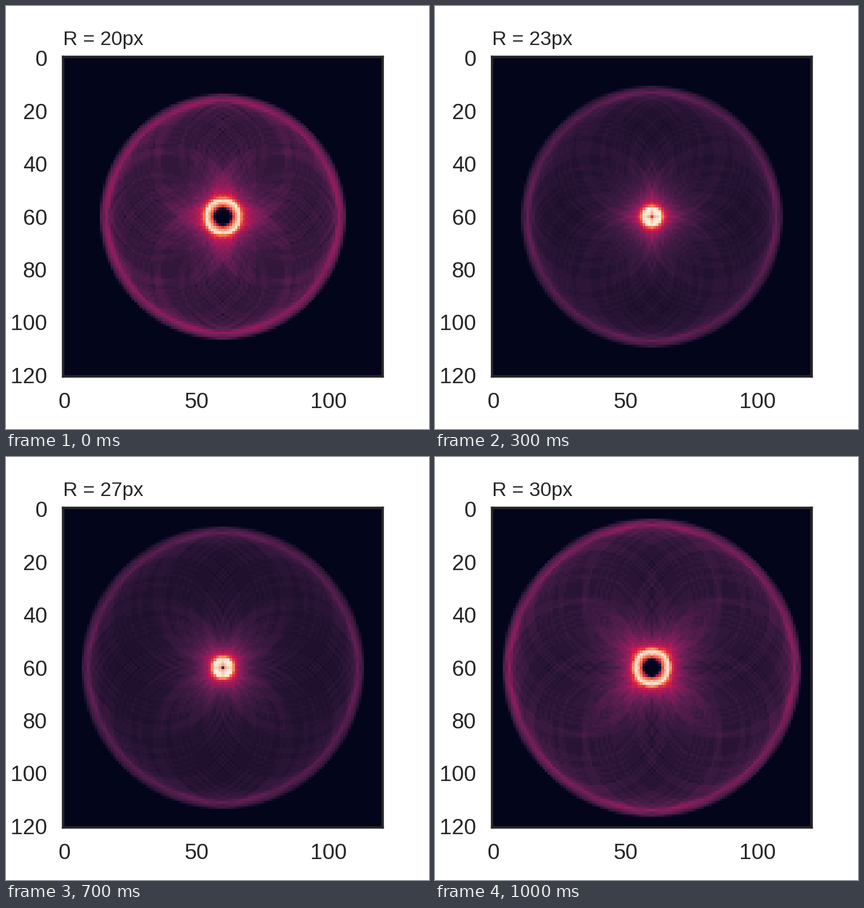
Recreate the animation shown at these times as a matplotlib script. Size 748 px wide and 748 px high, loop 1.1 s.

```python
import numpy as np
import matplotlib.pyplot as plt
from matplotlib.animation import FuncAnimation
from matplotlib.colors import LinearSegmentedColormap

STAGE, DPI = 748, 100
SIZE, MID = 121, 60          # accumulator cells, centre cell
EDGE_RADIUS = 25
RADII = range(20, 31)
INK = "#262626"

ROCKET = LinearSegmentedColormap.from_list("rocket", [
    (0, "#03051a"), (1 / 7, "#36193e"), (1 / 4, "#611f53"), (1 / 3, "#841e5a"),
    (0.4, "#a11a5b"), (0.5, "#cb1b4f"), (0.6, "#e83f3f"), (2 / 3, "#f06043"),
    (0.75, "#f4875e"), (6 / 7, "#f6b48f"), (1, "#faebdd")])


def pt(px):
    return px * 72 / DPI


def perimeter(radius):
    """Bresenham circle; points shared by two octants are listed twice."""
    points = []
    a, b, d = radius, 0, 3 - 2 * radius
    while a >= b:
        for u, v in ((a, b), (b, a)):
            points += [(u, v), (-u, v), (u, -v), (-u, -v)]
        if d < 0:
            d += 4 * b + 6
        else:
            d += 4 * (b - a) + 10
            a -= 1
        b += 1
    return points


def edge_mask():
    """Circle outline thickened by a 3x3 square."""
    mask = np.zeros((SIZE, SIZE))
    for x, y in perimeter(EDGE_RADIUS):
        r, c = MID + y, MID + x
        mask[r - 1:r + 2, c - 1:c + 2] = 1
    return mask


def hough(mask, radius):
    """Every edge cell votes for all centres at the given radius."""
    votes = np.zeros_like(mask)
    for x, y in perimeter(radius):
        votes += np.roll(mask, (y, x), axis=(0, 1))
    return votes / votes.max()


plt.rcParams["font.family"] = "Liberation Sans"
fig = plt.figure(figsize=(STAGE / DPI, STAGE / DPI), dpi=DPI, facecolor="white")
left, top, side = 101, 90, 565
ax = fig.add_axes([left / STAGE, 1 - (top + side) / STAGE,
                   side / STAGE, side / STAGE])

mask = edge_mask()
spaces = [hough(mask, r) for r in RADII]
image = ax.imshow(spaces[0], cmap=ROCKET, vmin=0, vmax=1,
                  interpolation="nearest", aspect="auto")

ax.set_xticks([0, 50, 100])
ax.set_yticks(range(0, 121, 20))
ax.tick_params(length=0, pad=pt(28.2), labelsize=pt(38.8), labelcolor=INK)
for spine in ax.spines.values():
    spine.set(linewidth=pt(4.4), edgecolor=INK)
title = ax.set_title("", loc="left", pad=pt(21.2), fontsize=pt(35.2), color=INK)


def update(i):
    image.set_data(spaces[i])
    title.set_text(f"R = {RADII[i]}px")
    return image, title


anim = FuncAnimation(fig, update, frames=len(RADII), interval=100,
                     repeat=True, repeat_delay=0, blit=False)
plt.show()
```
